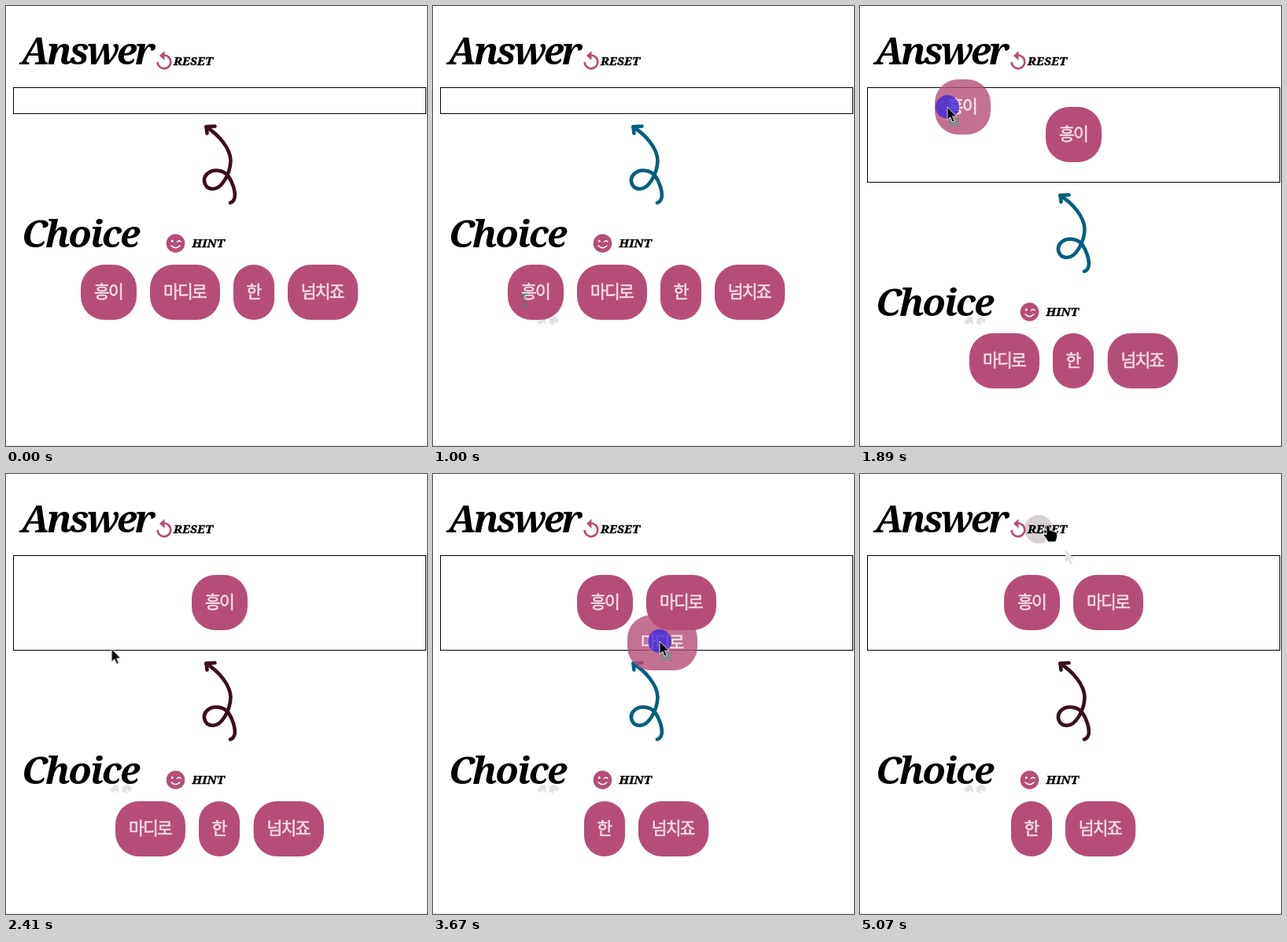
These frames come from a looping animation (535x558 px, 5.2 s). An HTML page:

```html
<!DOCTYPE html>
<html lang="ko">
<head>
<meta charset="utf-8">
<title>Word order quiz</title>
<style>
  html, body { margin: 0; width: 100%; height: 100%; overflow: hidden; background: #fff; }
  svg { display: block; width: 535px; height: 558px; }
  .title, .label { font-family: "Noto Serif", serif; font-weight: 700; font-style: italic; }
  .title { font-size: 48px; letter-spacing: -2.1px; }
  .tight { letter-spacing: -3.3px; }
  .label { font-size: 15px; letter-spacing: .4px; stroke: #000; stroke-width: .4px; }
  .word text {
    font: 21.5px "Noto Sans CJK KR", "Noto Sans CJK", sans-serif;
    letter-spacing: -1.8px; text-anchor: middle;
    fill: #f4dde7; stroke: #f4dde7; stroke-width: .6px;
  }
  .word rect, .icon { fill: #b64d78; }
  .ghost { opacity: .8; }
  .line { fill: none; stroke-linecap: round; stroke-linejoin: round; }
  .trail { fill: #e2e2e2; }

  /* every part shares one 5.2 s clock and changes in hard steps */
  .t { animation: 5200ms step-end infinite; }

  #box { animation-name: box; }
  @keyframes box { 0% { height: 33px } 36.34%, 100% { height: 120px } }
  #lower { animation-name: lower; }
  @keyframes lower { 0% { transform: none } 36.34%, 100% { transform: translateY(87px) } }

  #w1 { animation-name: w1; }
  #w2 { animation-name: w2; }
  #w3 { animation-name: w3; }
  #w4 { animation-name: w4; }
  @keyframes w1 {
    0% { transform: translate(95px, 328px) }
    36.34% { transform: translate(236px, 128px) }
    70.57%, 100% { transform: translate(183px, 128px) }
  }
  @keyframes w2 {
    0% { transform: translate(183px, 328px) }
    36.34% { transform: translate(139px, 415px) }
    70.57%, 100% { transform: translate(271px, 128px) }
  }
  @keyframes w3 {
    0% { transform: translate(289px, 328px) }
    36.34% { transform: translate(245px, 415px) }
    70.57%, 100% { transform: translate(192px, 415px) }
  }
  @keyframes w4 {
    0% { transform: translate(357.8px, 328px) }
    36.34% { transform: translate(314.4px, 415px) }
    70.57%, 100% { transform: translate(260.8px, 415px) }
  }

  #plum, #teal { animation: plum calc(5200ms / 6) step-end infinite; }
  #teal { animation-name: teal; }
  @keyframes plum { 0%, 57%, 100% { visibility: visible } 7% { visibility: hidden } }
  @keyframes teal { 0%, 57%, 100% { visibility: hidden } 7% { visibility: visible } }

  #mouse { animation-name: mouse; }
  @keyframes mouse {
    0% { transform: translate(410px, 600px) }
    2.11% { transform: translate(410px, 490px); animation-timing-function: steps(5) }
    14.23% { transform: translate(150px, 388px) }
    16.73% { transform: translate(133px, 387px) }
    19.23% { transform: translate(116px, 373px) }
    24.42% { transform: translate(111px, 363px); animation-timing-function: steps(2) }
    28.84% { transform: translate(111px, 294px); animation-timing-function: steps(3) }
    36.34% { transform: translate(111px, 128px) }
    41.34% { transform: translate(111px, 128px); animation-timing-function: steps(7) }
    58.84% { transform: translate(192px, 456px) }
    63.46% { transform: translate(180px, 448px); animation-timing-function: steps(3) }
    70.57% { transform: translate(288px, 212px); animation-timing-function: steps(3) }
    78.07% { transform: translate(309px, 174px) }
    82.88% { transform: translate(309px, 174px); animation-timing-function: steps(3) }
    89.99% { transform: translate(261px, 97px) }
    92.49% { transform: translate(246px, 76px) }
    94.99%, 100% { transform: translate(239px, 65px) }
  }

  #ghost1 { animation-name: drag1; }
  #ghost2 { animation-name: drag2; }
  #disk { animation-name: hold; }
  #pointer { animation-name: pointer; }
  #beam { animation-name: beam; }
  #deny { animation-name: deny; }
  #drop { animation-name: drop; }
  #hand { animation-name: hand; }
  #click { animation-name: click; }
  #trail1 { animation-name: trail1; }
  #trail2 { animation-name: trail2; }
  @keyframes drag1 { 0%, 41.34%, 100% { opacity: 0 } 24.42% { opacity: .8 } }
  @keyframes drag2 { 0%, 82.88%, 100% { opacity: 0 } 63.46% { opacity: .8 } }
  @keyframes hold { 0%, 41.34%, 82.88%, 100% { opacity: 0 } 24.42%, 63.46% { opacity: 1 } }
  @keyframes pointer { 0%, 19.23%, 56.34%, 92.49%, 100% { opacity: 0 } 2.11%, 36.34%, 70.57% { opacity: 1 } }
  @keyframes beam { 0%, 24.42%, 63.46%, 100% { opacity: 0 } 19.23%, 56.34% { opacity: 1 } }
  @keyframes deny { 0%, 36.34%, 70.57%, 100% { opacity: 0 } 24.42%, 63.46% { opacity: 1 } }
  @keyframes drop { 0%, 41.34%, 82.88%, 100% { opacity: 0 } 36.34%, 70.57% { opacity: 1 } }
  @keyframes hand { 0% { opacity: 0 } 92.49%, 100% { opacity: 1 } }
  @keyframes click { 0% { opacity: 0 } 97.49%, 100% { opacity: 1 } }
  @keyframes trail1 { 0% { opacity: 0 } 16.73%, 100% { opacity: 1 } }
  @keyframes trail2 { 0% { opacity: 0 } 92.49%, 100% { opacity: 1 } }
</style>
</head>
<body>
<svg viewBox="0 0 535 558">
  <defs>
    <g id="word1" class="word"><rect width="71" height="70" rx="30"/><text x="35" y="41.500">흥이</text></g>
    <g id="word2" class="word"><rect width="89" height="70" rx="30"/><text x="44" y="41.500">마디로</text></g>
    <g id="word3" class="word"><rect width="52" height="70" rx="26"/><text x="25.500" y="41.500">한</text></g>
    <g id="word4" class="word"><rect width="89.500" height="70" rx="30"/><text x="44" y="41.500">넘치죠</text></g>
    <path id="arrow" d="M0 0V16.5L3.8 13L6.5 19.2L9.2 18L6.5 12H11.7Z"/>
    <path id="ban" d="M-8 0A8 8 0 1 1 8 0A8 8 0 1 1 -8 0M-5.600 -5.600L5.600 5.600"/>
    <g id="curl">
      <path d="M254.500 153.500C270 163 285 180 285.500 196C285 213 274 232 263 232C252 232 248.500 219 256 212.500C264 206 276 208 282 215C288 223 292 236 290.500 243C289.500 247 287.500 249 285 249.500"/>
      <path d="M255.500 161.500L254.500 153L265.500 152.500"/>
    </g>
    <pattern id="dots" width="2" height="2" patternUnits="userSpaceOnUse">
      <rect width="2" height="2" fill="#fff"/>
      <path d="M0 0H1V1H0ZM1 1H2V2H1Z" fill="#111"/>
    </pattern>
  </defs>

  <path d="M0 557.5H535" stroke="#e3e3e3"/>
  <circle id="click" class="t" cx="227" cy="70" r="18" fill="#d9d0d4"/>
  <text class="title tight" x="19" y="74">Answer</text>
  <path class="line" d="M201 62.5A8.4 8.4 0 1 1 192.6 71" stroke="#b64d78" stroke-width="2.700" style="stroke-linecap:butt"/>
  <path class="icon" d="M201.5 57V69L195 63Z"/>
  <text class="label" x="213" y="75">RESET</text>
  <rect id="box" class="t" x="9.5" y="103.5" width="524" height="33" fill="none" stroke="#000"/>

  <g id="trail1" class="t trail">
    <path d="M132 401L138 394L143 395L144 405L140 401L136 404Z"/>
    <path d="M148 397L154 393L160 398L158 403L154 400L153 405L148 403Z"/>
  </g>
  <use id="trail2" class="t trail" href="#arrow" x="261" y="96"/>

  <g id="lower" class="t">
    <use id="plum" class="line" href="#curl" stroke="#3a1021" stroke-width="4.600"/>
    <use id="teal" class="line" href="#curl" stroke="#045f80" stroke-width="4.600"/>
    <text class="title" x="20" y="306">Choice</text>
    <circle class="icon" cx="215.500" cy="301" r="11.800"/>
    <circle cx="211.300" cy="298" r="1.500" fill="#fff"/>
    <path class="line" d="M217.500 299Q219.700 296.500 222 299M210 304Q215.500 309.500 221 304" stroke="#fff" stroke-width="1.500"/>
    <text class="label" x="236.500" y="306">HINT</text>
  </g>

  <use id="w1" class="t" href="#word1"/>
  <use id="w2" class="t" href="#word2"/>
  <use id="w3" class="t" href="#word3"/>
  <use id="w4" class="t" href="#word4"/>

  <g id="mouse" class="t">
    <use id="ghost1" class="t ghost" href="#word1" x="-16" y="-35"/>
    <use id="ghost2" class="t ghost" href="#word2" x="-41" y="-33"/>
    <circle id="disk" class="t" r="15" fill="#3c28d7" fill-opacity=".78"/>
    <path id="beam" class="t line" d="M-3.500 -7.500H-1L0 -6.500L1 -7.500H3.500M0 -6.500V6.500M-3.500 7.500H-1L0 6.500L1 7.500H3.500" stroke="#4d8578" stroke-width="1.300"/>
    <g id="deny" class="t line">
      <use href="#ban" stroke="#c8c0f4" stroke-width="3.400"/>
      <use href="#ban" stroke="#2b1f9a" stroke-width="1.500"/>
    </g>
    <rect id="drop" class="t" x="2" y="14" width="13" height="11" fill="url(#dots)"/>
    <use id="pointer" class="t" href="#arrow" fill="#080810" stroke="#fff" stroke-width=".8"/>
    <path id="hand" class="t" d="M-2 1.500Q0 -1.500 2 1.500V7Q4 5.500 5.500 7.500Q7.500 6.500 8.500 8.500Q11.500 8 11.500 11V15Q11 18 9.500 21H0Q-2 17 -5.500 13Q-6 9.500 -2 12Z" fill="#000" stroke="#fff" stroke-width=".8"/>
  </g>
</svg>
</body>
</html>
```
